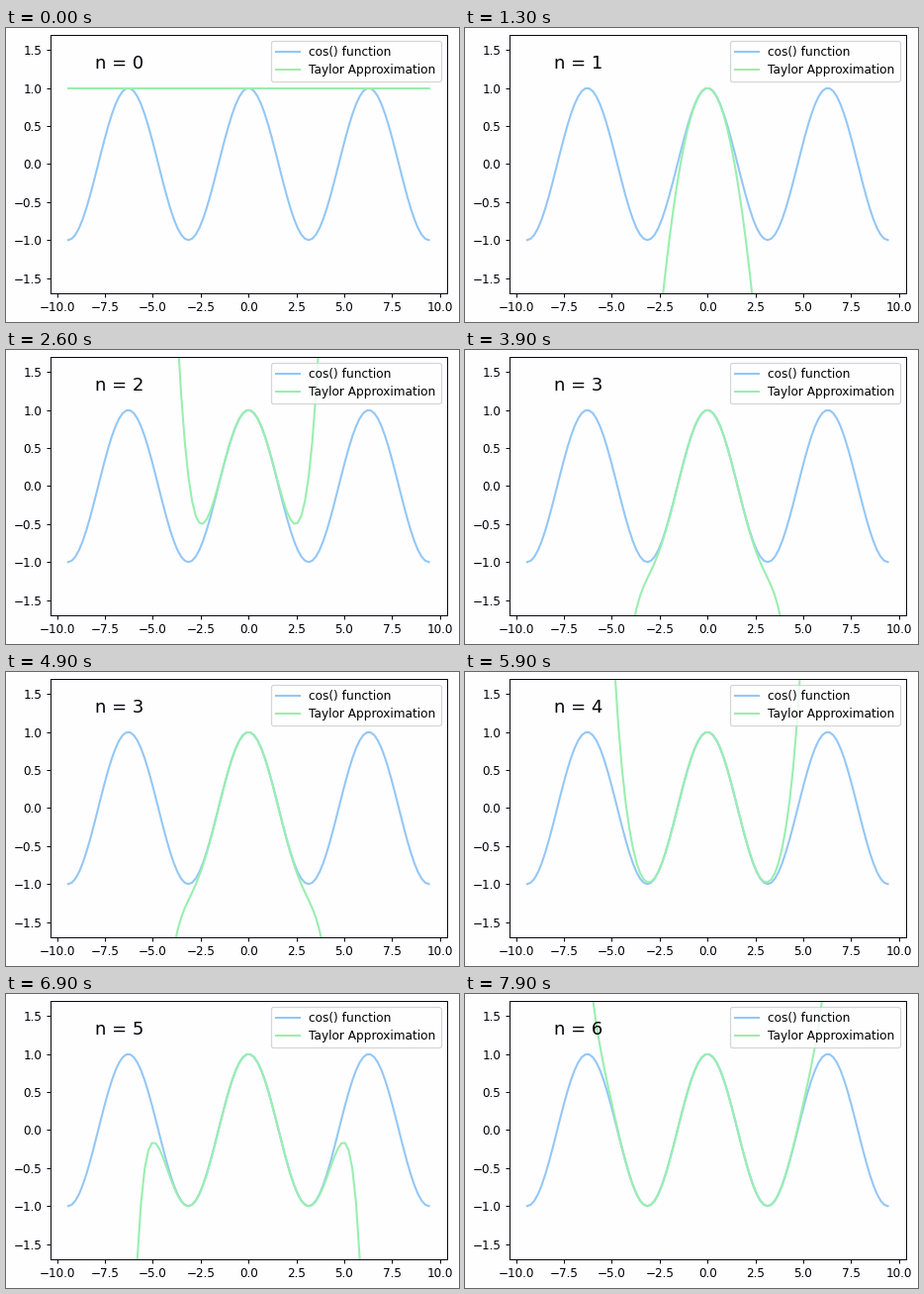
A matplotlib script that plays this animation: 458x297 px, repeating every 8 s.

```python
import math

import matplotlib.pyplot as plt
import numpy as np
from matplotlib.animation import FuncAnimation

W, H, DPI = 458, 297, 86.4
STEP, LOOP = 100, 8000                                  # ms
STARTS = [0, 1300, 2600, 3900, 5300, 6600, 7900]        # ms at which n = 0, 1, 2...
PAPER, BLUE, GREEN = "#fefdff", "#93c7f4", "#98efae"

plt.rcParams["font.family"] = "DejaVu Sans"
plt.rcParams["lines.linewidth"] = 1.7
fig = plt.figure(figsize=((W + 0.01) / DPI, (H + 0.01) / DPI), dpi=DPI,
                 facecolor=PAPER)
left, top, width, height = 44.6, 6.9, 401.2, 261.1
ax = fig.add_axes([left / W, 1 - (top + height) / H, width / W, height / H],
                  facecolor=PAPER)

x = np.linspace(-3 * np.pi, 3 * np.pi, 100)


def taylor(n):
    """Sum of the cosine series up to the x^(2n) term."""
    return sum((-1) ** k * x ** (2 * k) / math.factorial(2 * k)
               for k in range(n + 1))


ax.plot(x, np.cos(x), color=BLUE, label="cos() function")
approx, = ax.plot(x, taylor(0), color=GREEN, label="Taylor Approximation")
label = ax.text(-8, 1.25, "n = 0", fontsize=15)
ax.set_xlim(-3.3 * np.pi, 3.3 * np.pi)
ax.set_ylim(-1.7, 1.7)
ax.set_xticks(np.arange(-10, 10.1, 2.5))
ax.set_yticks(np.arange(-1.5, 1.6, 0.5))
ax.legend(loc="upper right", fontsize=10.1, handletextpad=0.75,
          labelspacing=0.4, borderpad=0.42)


def update(i):
    n = sum(i * STEP >= s for s in STARTS) - 1
    approx.set_ydata(taylor(n))
    label.set_text(f"n = {n}")
    return approx, label


anim = FuncAnimation(fig, update, frames=LOOP // STEP, interval=STEP,
                     init_func=lambda: update(0), repeat=True, repeat_delay=0)
plt.show()
```
